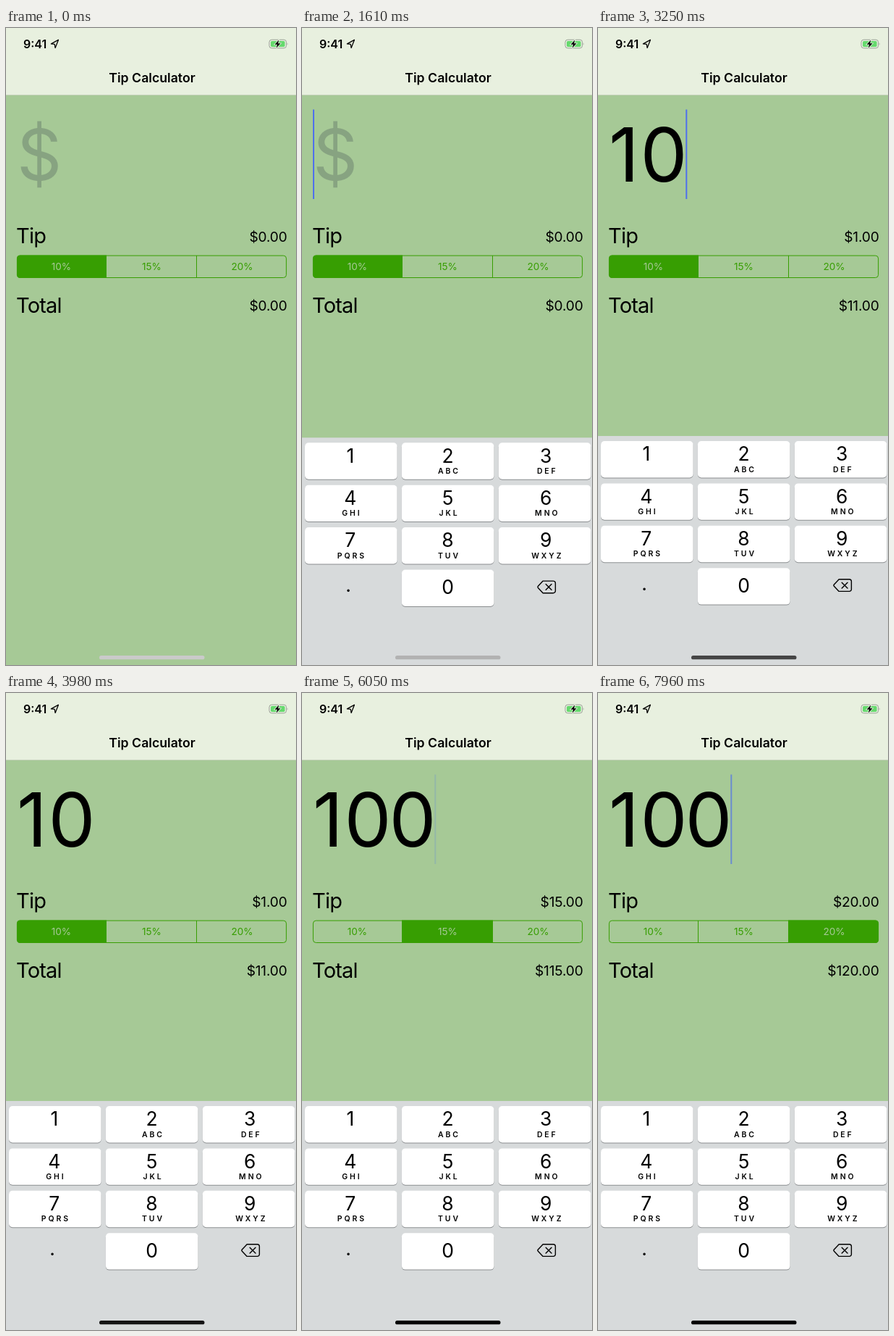
An HTML page that plays this animation: 401x879 px, repeating every 8 s.

```html
<!DOCTYPE html>
<html lang="en">
<head>
<meta charset="utf-8">
<title>Tip Calculator</title>
<style>
  html, body { margin: 0; width: 100%; height: 100%; overflow: hidden; background: #a6c996; }
  svg { display: block; width: 100%; height: 100%; }
  text { font-family: Inter, Roboto, "Liberation Sans", sans-serif; font-optical-sizing: none; }
  .mid { text-anchor: middle; }
  .end { text-anchor: end; }
  .label { font-size: 29px; letter-spacing: -0.8px; }
  .money { font-size: 19.2px; letter-spacing: -0.2px; }
  .rate { font-size: 13.6px; }
  .digit { font-size: 26.5px; }
  .letters { font-size: 10.5px; font-weight: 600; letter-spacing: 2.9px; }
</style>
</head>
<body>
<svg viewBox="0 0 401 879">
  <rect width="401" height="879" fill="#a6c996"/>
  <rect width="401" height="92.5" fill="#e8f0df"/>
  <rect y="92" width="401" height="0.8" fill="#c3cfb9"/>

  <text x="24" y="28" font-size="16" font-weight="600">9:41</text>
  <path d="M72.4 16.4 L62.4 21.9 L67.2 22.4 L68.1 27.4 Z" fill="none" stroke="#000" stroke-width="1.3" stroke-linejoin="round"/>
  <rect x="364" y="16.2" width="23.6" height="11.6" rx="3.4" fill="none" stroke="#98a095"/>
  <path d="M388.8 20 q1.6 2 0 4 z" fill="#98a095"/>
  <rect x="366" y="18.1" width="19.6" height="7.8" rx="1.6" fill="#65d96d"/>
  <path d="M377.3 16.6 L371.6 22.7 H375 L373.8 27.4 L379.6 21.2 H376.2 Z" fill="#000" stroke="#e8f0df" stroke-width="1.6" paint-order="stroke"/>
  <text class="mid" x="202" y="75" font-size="17.7" font-weight="600">Tip Calculator</text>

  <text id="hint" class="mid" x="46" y="209.5" font-size="97" fill="#87a381">$</text>
  <text id="bill" y="212" font-size="103"></text>
  <rect id="caret" y="112.5" width="2" height="123.5" fill="#4f70ec"/>

  <text class="label" x="14" y="297">Tip</text>
  <text class="label" x="14" y="393">Total</text>
  <text id="tip" class="money end" x="388.6" y="294.5"></text>
  <text id="total" class="money end" x="388.6" y="389.5"></text>

  <clipPath id="round"><rect x="15" y="313.6" width="373" height="31.4" rx="4.2"/></clipPath>
  <rect id="chosen" y="313" height="33" width="125" fill="#379e02" clip-path="url(#round)"/>
  <path d="M138.5 314 V345 M263.5 314 V345" stroke="#379e02"/>
  <rect x="15.4" y="314.1" width="372.2" height="30.4" rx="4" fill="none" stroke="#379e02"/>
  <g id="rates"></g>

  <g id="keyboard">
    <rect y="563" width="401" height="320" fill="#d7dadb"/>
    <g id="keys"></g>
    <text class="digit mid" x="64" y="775.5">.</text>
    <path d="M333.2 760.8 H347.4 a3 3 0 0 1 3 3 V774.4 a3 3 0 0 1 -3 3 H333.2 L326.4 770.2 q-1 -1.1 0 -2.2 Z M337.2 765.2 l7.8 7.8 m0 -7.8 l-7.8 7.8" fill="none" stroke="#000" stroke-width="1.4" stroke-linejoin="round" stroke-linecap="round"/>
  </g>
  <rect id="home" x="129" y="866" width="145.5" height="5.3" rx="2.65"/>
</svg>
<script>
const LOOP = 8000;
const FOCUS = 1227;
const KEYBOARD_HEIGHT = 316;
const SPRING = 18.26;

// [time, digits shown]
const typing = [[0, ""], [2600, "1"], [3000, "10"], [4400, "100"]];
// [time, selected segment]
const choices = [[0, 0], [5450, 1], [6850, 2]];

const rates = [10, 15, 20];
const segmentEdges = [14, 138, 263, 389];
const keyCenters = [66.8, 201.5, 337.3];
const letters = ["", "ABC", "DEF", "GHI", "JKL", "MNO", "PQRS", "TUV", "WXYZ"];

const $ = id => document.getElementById(id);
const clamp = v => Math.min(1, Math.max(0, v));
const latest = (steps, t) => steps.filter(s => s[0] <= t).pop();
const money = v => "$" + v.toFixed(2);

function add(parent, name, attrs, content = "") {
  const el = document.createElementNS("http://www.w3.org/2000/svg", name);
  for (const key in attrs) el.setAttribute(key, attrs[key]);
  el.textContent = content;
  return parent.appendChild(el);
}

function addKey(col, row, digit, sub) {
  const box = { x: 4 + 133.9 * col, width: 127.6, height: 50.4, rx: 5 };
  const y = 570 + 58.4 * row;
  add($("keys"), "rect", { ...box, y: y + 1, fill: "#8b8e90" });
  add($("keys"), "rect", { ...box, y, fill: "#fff" });
  const x = keyCenters[col];
  add($("keys"), "text", { class: "digit mid", x, y: y + (row === 3 ? 33.9 : 27.3) }, digit);
  if (sub) add($("keys"), "text", { class: "letters mid", x: x + 2, y: y + 42.5 }, sub);
}

letters.forEach((sub, i) => addKey(i % 3, Math.floor(i / 3), i + 1, sub));
addKey(1, 3, 0);

const rateLabels = rates.map((r, i) =>
  add($("rates"), "text", { class: "rate mid", x: 76.5 + 125 * i, y: 334.2 }, r + "%"));

function caretAlpha(t, since) {
  if (t < FOCUS) return 0;
  const p = (t - Math.max(since, FOCUS)) / 1000;
  const phase = p % 1;
  const fadeIn = p < 1 ? 0 : clamp((phase - 0.85) / 0.15);
  const out = 1 - clamp((phase - 0.5) / 0.19);
  return Math.max(out, fadeIn);
}

function draw(t) {
  const [since, bill] = latest(typing, t);
  const choice = latest(choices, t)[1];
  const amount = Number(bill);
  const tip = amount * rates[choice] / 100;

  $("hint").style.display = bill ? "none" : "";
  $("bill").textContent = bill;
  $("bill").setAttribute("x", "15 58.6 120.6");
  $("tip").textContent = money(tip);
  $("total").textContent = money(amount + tip);

  $("caret").setAttribute("x", bill ? 59.3 + 62 * (bill.length - 1) : 15);
  $("caret").setAttribute("opacity", caretAlpha(t, since));

  $("chosen").setAttribute("x", segmentEdges[choice]);
  $("chosen").setAttribute("width", segmentEdges[choice + 1] - segmentEdges[choice] + (choice < 2 ? 1 : 0));
  rateLabels.forEach((el, i) => el.setAttribute("fill", i === choice ? "#a6c996" : "#379e02"));

  // critically damped spring
  const w = SPRING * Math.max(0, t - FOCUS) / 1000;
  const hidden = (1 + w) * Math.exp(-w);
  $("keyboard").setAttribute("transform", `translate(0 ${KEYBOARD_HEIGHT * hidden})`);
  $("keyboard").style.display = t < FOCUS ? "none" : "";

  const shade = Math.round(202 * (1 - clamp((t - 1250) / 3030)));
  $("home").setAttribute("fill", `rgb(${shade},${shade},${shade})`);
}

const start = performance.now();
function tick() {
  draw((performance.now() - start) % LOOP);
  requestAnimationFrame(tick);
}
tick();
</script>
</body>
</html>
```
